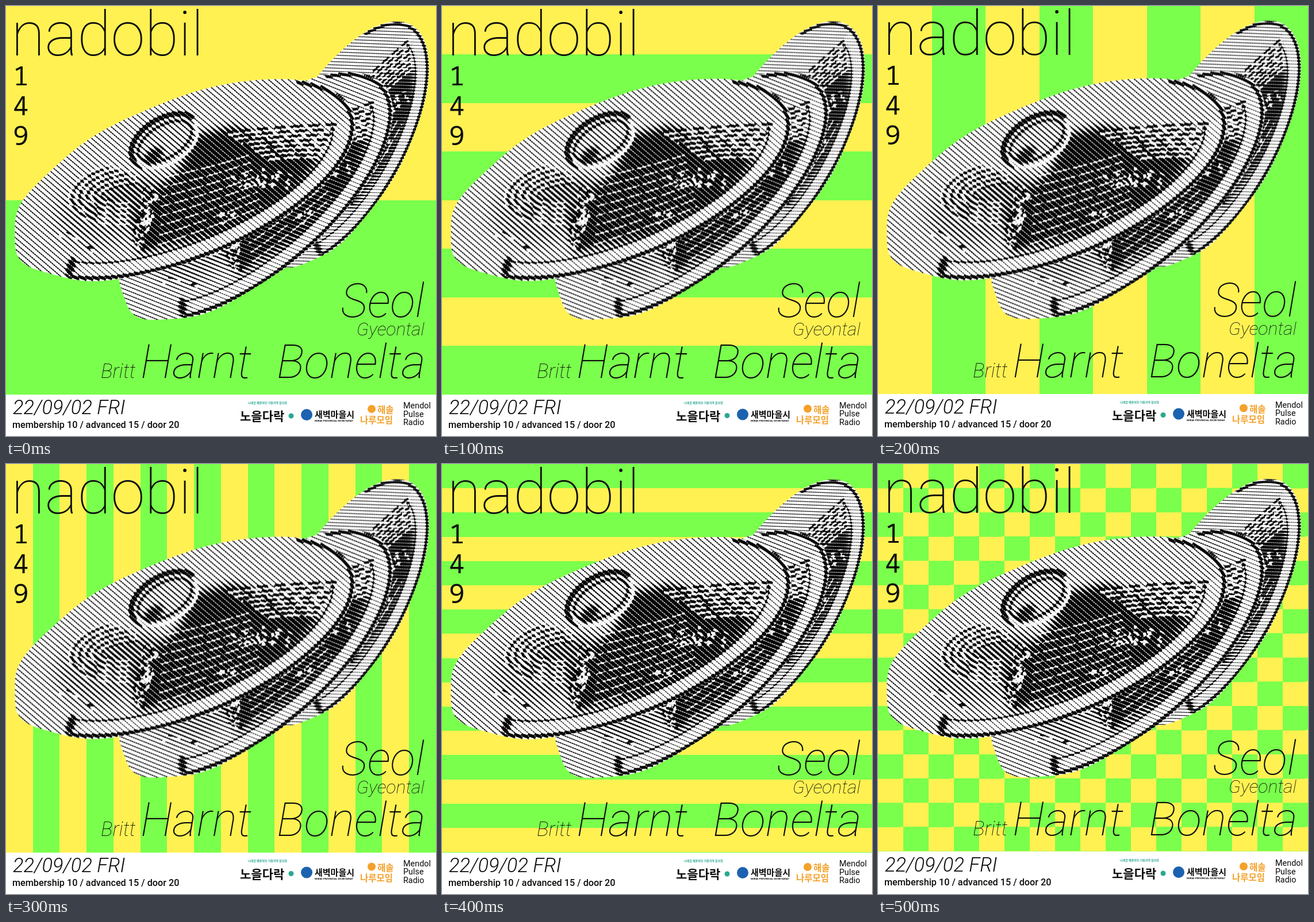
Write an HTML page with a canvas that moves like this. It is 748 px wide and 748 px high and loops after 600 ms.

```html
<!DOCTYPE html>
<html lang="en">
<head>
<meta charset="utf-8">
<title>Concert poster</title>
<style>
  html, body { margin: 0; width: 100%; height: 100%; overflow: hidden; background: #fff; }
  #stage { position: relative; width: 748px; height: 748px; overflow: hidden; background: #fff; }
  #art, #art > * { position: absolute; left: 0; top: 0; }
  #art { width: 748px; height: 748px; animation: nudge .6s step-end infinite; }

  .bg {
    --y: #fff152; --g: #7aff4c;
    position: absolute; left: 0; top: 0; width: 748px; height: 676px; visibility: hidden;
    animation: show .6s step-end infinite;
    animation-delay: calc(var(--i) * 100ms - 600ms);
  }
  .half { background: linear-gradient(var(--y) 338.5px, var(--g) 0); }
  .rows { background: repeating-linear-gradient(var(--y) 0 84.5px, var(--g) 84.5px 169px); }
  .cols { background: repeating-linear-gradient(90deg, var(--y) 0 94px, var(--g) 94px 187px); height: 675px; }
  .thin-cols { background: repeating-linear-gradient(90deg, var(--y) 0 46.75px, var(--g) 46.75px 93.5px); }
  .thin-rows { background: repeating-linear-gradient(var(--g) 0 42.2px, var(--y) 42.2px 84.4px); height: 675.5px; }
  .checks {
    background: conic-gradient(var(--y) 25%, var(--g) 0 50%, var(--y) 0 75%, var(--g) 0) 0 0 / 88px 84.2px;
    height: 673.6px;
  }

  @keyframes show { 0% { visibility: visible; } 16.66%, 100% { visibility: hidden; } }
  @keyframes nudge {
    0% { transform: none; }
    16.66% { transform: translateY(-.5px); }
    33.33% { transform: translateY(-1.5px); }
    50% { transform: translateY(-.5px); }
    66.66% { transform: none; }
    83.33%, 100% { transform: translateY(-1px); }
  }

  text { font-family: Roboto, "Open Sans", sans-serif; fill: #0c0c0c; }
  .light { font-weight: 200; }
  .digits text { font-family: "Noto Sans Mono", monospace; }
  .slant { font-weight: 250; font-style: italic; }
  .end { text-anchor: end; }
  .ko { font-family: "Noto Sans CJK KR", "Noto Sans CJK", sans-serif; font-weight: 700; }
</style>
</head>
<body>
<div id="stage">
  <div class="bg half" style="--i:0"></div>
  <div class="bg rows" style="--i:1"></div>
  <div class="bg cols" style="--i:2"></div>
  <div class="bg thin-cols" style="--i:3"></div>
  <div class="bg thin-rows" style="--i:4"></div>
  <div class="bg checks" style="--i:5"></div>
  <div id="art">
    <canvas id="hats" width="748" height="748"></canvas>
    <svg width="748" height="748" viewBox="0 0 748 748">
      <text class="light" x="9" y="86" font-size="107">nadobil</text>
      <g class="light digits" font-size="46">
        <text x="12" y="138">1</text>
        <text x="12" y="190">4</text>
        <text x="12" y="242">9</text>
      </g>
      <g class="slant">
        <text class="end" x="728" y="541" font-size="81">Seol</text>
        <text class="end" x="728" y="573" font-size="32">Gyeontal</text>
        <text x="165" y="647" font-size="35">Britt</text>
        <text x="234" y="647" font-size="82">Harnt</text>
        <text class="end" x="730" y="647" font-size="82">Bonelta</text>
        <text x="12" y="710" font-size="34.5" font-weight="300">22/09/02 FRI</text>
      </g>
      <text x="11" y="734" font-size="16.2" font-weight="500">membership 10 / advanced 15 / door 20</text>
      <g font-size="14.4">
        <text x="691" y="700">Mendol</text>
        <text x="691" y="714.5">Pulse</text>
        <text x="691" y="729">Radio</text>
      </g>

      <text class="ko" x="421" y="692" font-size="5" style="fill:#2ba893">나래골 예술마당 거점지역 활성화</text>
      <text class="ko" x="407" y="721" font-size="21">노을다락</text>
      <circle cx="496" cy="713" r="4.5" fill="#2ba893"/>

      <circle cx="523" cy="711" r="10" fill="#1c62b0"/>
      <text class="ko" x="537" y="716" font-size="15">새벽마을시</text>
      <text x="537" y="723" font-size="4.2" font-weight="600">NORAE PROVINCIAL SECRETARIAT</text>

      <circle cx="636" cy="701" r="7" fill="#f5a12b"/>
      <text class="ko" x="646" y="708" font-size="15.5" style="fill:#f5a12b">해솔</text>
      <text class="ko" x="616" y="726" font-size="15.5" style="fill:#f5a12b">나루모임</text>
    </svg>
  </div>
</div>
<script>
// One hat, drawn level around (0, 0), then stamped three times
const RX = 317, RY = 138, W = 700, H = 320, ZOOM = 2;
const SLANT = 62.7 * Math.PI / 180, PERIOD = 7.5;

const hat = document.createElement('canvas');
hat.width = W * ZOOM;
hat.height = H * ZOOM;
const ctx = hat.getContext('2d', { willReadFrequently: true });
ctx.setTransform(ZOOM, 0, 0, ZOOM, W / 2 * ZOOM, H / 2 * ZOOM);

let seed = 149;
const rand = () => (seed = (seed * 16807) % 2147483647) / 2147483647;

function tone(v, blur) {
  ctx.fillStyle = ctx.strokeStyle = `rgb(${[v, v, v].map(n => Math.round(n * 255))})`;
  ctx.filter = blur ? `blur(${blur * ZOOM}px)` : 'none';
}

function spot(x, y, rx, ry, turn, v, blur) {
  tone(v, blur);
  ctx.beginPath();
  ctx.ellipse(x, y, rx, ry, turn, 0, 7);
  ctx.fill();
}

// Part of an ellipse, angles in degrees
function arc(x, y, rx, ry, turn, from, to, v, width, dash = []) {
  tone(v, .8);
  ctx.lineWidth = width;
  ctx.setLineDash(dash);
  ctx.beginPath();
  ctx.ellipse(x, y, rx, ry, turn, from * Math.PI / 180, to * Math.PI / 180);
  ctx.stroke();
}

function line(x1, y1, x2, y2, bend, v, width, dash) {
  tone(v, .6);
  ctx.lineWidth = width;
  ctx.setLineDash(dash);
  ctx.lineDashOffset = rand() * 30;
  ctx.beginPath();
  ctx.moveTo(x1, y1);
  ctx.quadraticCurveTo((x1 + x2) / 2, (y1 + y2) / 2 + bend, x2, y2);
  ctx.stroke();
  ctx.lineDashOffset = 0;
}

function specks(x1, y1, x2, y2, spread, count) {
  for (let i = 0; i < count; i++) {
    const t = rand(), off = () => (rand() - .5) * spread;
    spot(x1 + (x2 - x1) * t + off(), y1 + (y2 - y1) * t + off(),
      2 + rand() * 4, 1 + rand() * 2, rand() * 3, i % 3 ? 1 : 0, .5);
  }
}

function paintHat() {
  // Slightly uneven outline
  ctx.beginPath();
  for (let a = 0; a < 6.28; a += .02) {
    const r = 1 + .006 * Math.sin(9 * a) * (1 - Math.cos(a));
    ctx.lineTo(RX * r * Math.cos(a), RY * r * Math.sin(a));
  }
  ctx.clip();
  tone(.8, 0);
  ctx.fillRect(-W / 2, -H / 2, W, H);

  // Shade on the left, dark body in the middle
  spot(-150, 0, 85, 58, .2, .62, 16);
  spot(-85, 5, 60, 40, .3, .45, 12);
  tone(.13, 8);
  ctx.beginPath();
  for (const [x, y] of [[-125, 88], [-100, 20], [0, -20], [43, -66], [117, -52], [235, 55], [154, 102], [20, 112]])
    ctx.lineTo(x, y);
  ctx.fill();

  // Loops around the crown
  for (let i = 0; i < 5; i++) {
    const grow = i * 13;
    arc(-95, -15, 50 + grow, 14 + grow * .7, .25, 130, 285 - i * 8, .2, 4, [30, 6]);
    arc(-95, -15, 56 + grow, 18 + grow * .7, .25, 95, 290 - i * 8, .97, 3, [24, 7]);
  }

  // Crown
  spot(-6, -76, 62, 34, -.16, .72, 2);
  arc(-6, -76, 64, 38, -.16, 150, 350, .08, 9);
  arc(-6, -74, 52, 28, -.16, 0, 360, .25, 5);
  arc(-4, -68, 58, 32, -.16, -10, 190, 1, 6);
  spot(-34, -58, 20, 11, -.3, .15, 4);

  // Folds across the body
  for (let i = 0; i < 8; i++) {
    const x = -30 - i * 8, y = -17 + i * 15;
    line(x, y, x + 150 + i * 6, y + 20 - i * 2, 5, .95, 2.4, [26, 6]);
  }

  // Streaks fanning to the right
  for (let i = 0; i < 7; i++) {
    const x = 100 + i * 8, y = -48 + i * 11, end = 284 - i * 9, drop = 12 + i * 6;
    line(x, y + 5, end, drop + 4, -4, .97, 4.5, [28, 7]);
    line(x, y, end, drop, -4, .04, 4.5, [20, 10]);
  }

  specks(-62, 0, -120, 78, 26, 100);
  specks(90, 38, 165, 68, 28, 50);
  specks(20, 75, 60, 95, 20, 10);
  specks(-260, -20, -180, 50, 40, 6);

  // Brim: pale band between a thin inner line and a heavy edge
  arc(0, 0, RX * .93, RY * .88, 0, 5, 140, .87, 20);
  arc(0, 0, RX * .87, RY * .79, 0, 5, 148, .05, 2.5);
  arc(0, 0, RX * .98, RY * .975, 0, -38, 143, .06, 6);
  spot(-240, 66, 18, 7, -.9, .08, 2);
}

// Turns grey tones into a line screen with beaded edges
function screen() {
  const img = ctx.getImageData(0, 0, hat.width, hat.height), d = img.data;
  const c = Math.cos(SLANT), s = Math.sin(SLANT);
  for (let i = 0; i < d.length; i += 4) {
    if (!d[i + 3]) continue;
    const n = i / 4, x = n % hat.width / ZOOM, y = Math.floor(n / hat.width) / ZOOM;
    const u = (y * c - x * s) / PERIOD, along = x * c + y * s;
    const wave = Math.abs(2 * (u - Math.floor(u)) - 1) + .08 * Math.sin(along * 1.5);
    const ink = Math.max(0, Math.min(1, (wave - d[i] / 255) * PERIOD / 2 * ZOOM + .5));
    d[i] = d[i + 1] = d[i + 2] = 252 - 248 * ink;
  }
  ctx.putImageData(img, 0, 0);
}

const out = document.getElementById('hats').getContext('2d');
out.imageSmoothingQuality = 'high';

function stamp(x, y, scale, degrees) {
  out.save();
  out.translate(x, y);
  out.rotate(degrees * Math.PI / 180);
  out.scale(scale, scale);
  out.drawImage(hat, -W / 2, -H / 2, W, H);
  out.restore();
}

paintHat();
screen();
stamp(588, 240, .75, -60.5);
stamp(435, 331, .93, -41);
stamp(310, 302, 1, -22.2);
</script>
</body>
</html>
```
